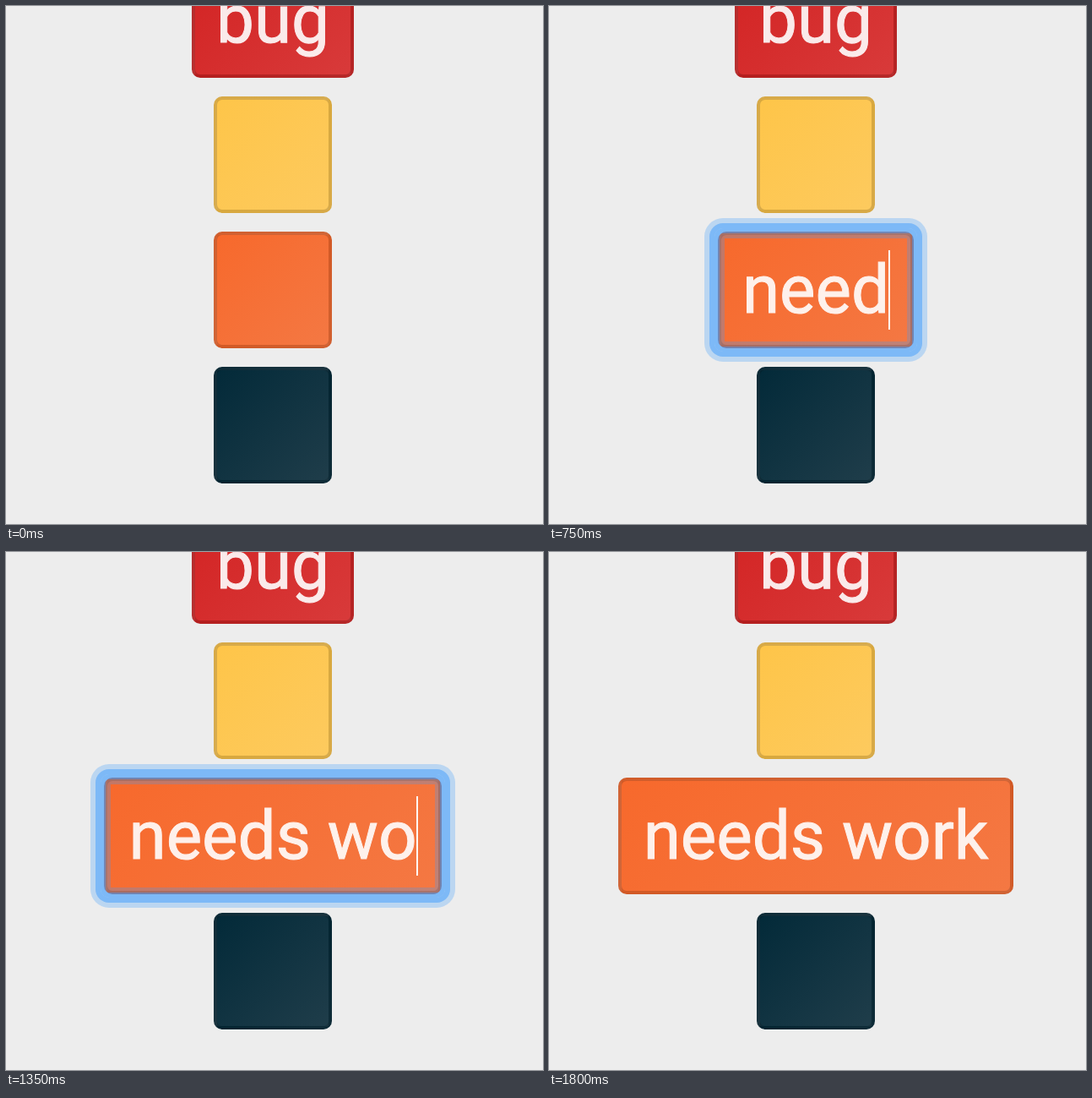
An HTML page for the animation above (1.95 s loop, 636 by 613 pixels).

```html
<!DOCTYPE html>
<html lang="en">
<head>
<meta charset="utf-8">
<title>Label editor</title>
<style>
  html, body { margin: 0; width: 100%; height: 100%; overflow: hidden; background: #ededed; }
  #stage { position: relative; width: 100%; height: 100%; overflow: hidden; }
  .label {
    position: absolute; box-sizing: border-box;
    left: 246px; width: 140px; height: 138px;
    border: 4px solid rgba(0, 0, 0, .15); border-radius: 10px;
    background: linear-gradient(135deg, var(--from), var(--to));
  }
  .bug    { top: -53px; left: 220px; width: 192px; --from: #d32323; --to: #d83a3a; }
  .yellow { top: 107px; --from: #fec549; --to: #fdca5e; }
  .orange { top: 267px; --from: #f7692c; --to: #f47843; }
  .navy   { top: 427px; --from: #032a39; --to: #1f3d4a; }
  /* Two translucent strokes centred on one path just outside the box */
  .focus::after {
    --strong: rgba(59, 153, 252, .49);
    --faint: rgba(59, 153, 252, .28);
    content: ""; position: absolute; inset: -8px; border-radius: 10px;
    box-shadow: 0 0 0 6px var(--strong), 0 0 0 12px var(--faint),
                inset 0 0 0 6px var(--strong), inset 0 0 0 12px var(--faint);
  }
  .text {
    position: absolute; left: 0; width: 632px;
    font: 400 80px/94px Roboto, sans-serif;
    text-align: center; white-space: pre;
    color: #fff; -webkit-text-stroke: 1px #fff; opacity: .9;
  }
  #caret { position: absolute; top: 289px; width: 2px; height: 94px; background: rgba(255, 255, 255, .95); }
</style>
</head>
<body>
<div id="stage">
  <div class="label bug"></div>
  <div class="text" style="top:-31px">bug</div>
  <div class="label yellow"></div>
  <div class="label orange" id="field"></div>
  <div class="text" style="top:289px"><span id="typed"></span></div>
  <div id="caret"></div>
  <div class="label navy"></div>
</div>
<script>
  const STEP = 150;
  const PHRASE = "needs work";
  const CENTER = 316;
  const PADDING = 30;
  const EMPTY_WIDTH = 80;
  const LAST = PHRASE.length + 2; // idle, empty focus, one step per letter, blur

  const [field, typed, caret] = ["field", "typed", "caret"].map(id => document.getElementById(id));
  let shown = -1;

  // Everything sits on a grid of two pixels
  const snap = (x, round) => 2 * round(x / 2);

  function show(step) {
    const focused = step > 0 && step < LAST;
    typed.textContent = PHRASE.slice(0, Math.max(0, step - 1));

    const textWidth = typed.getBoundingClientRect().width;
    const half = (textWidth || EMPTY_WIDTH) / 2 + PADDING;
    const left = snap(CENTER - half, Math.ceil);
    const right = snap(CENTER + half, Math.floor);
    field.style.left = left + "px";
    field.style.width = right - left + "px";
    field.classList.toggle("focus", focused);

    caret.hidden = !focused;
    caret.style.left = snap(CENTER + textWidth / 2 - 0.4, Math.round) + "px";
  }

  const start = performance.now();
  function tick() {
    const step = Math.floor((performance.now() - start) / STEP) % (LAST + 1);
    if (step !== shown) show(shown = step);
    requestAnimationFrame(tick);
  }
  tick();
</script>
</body>
</html>
```
